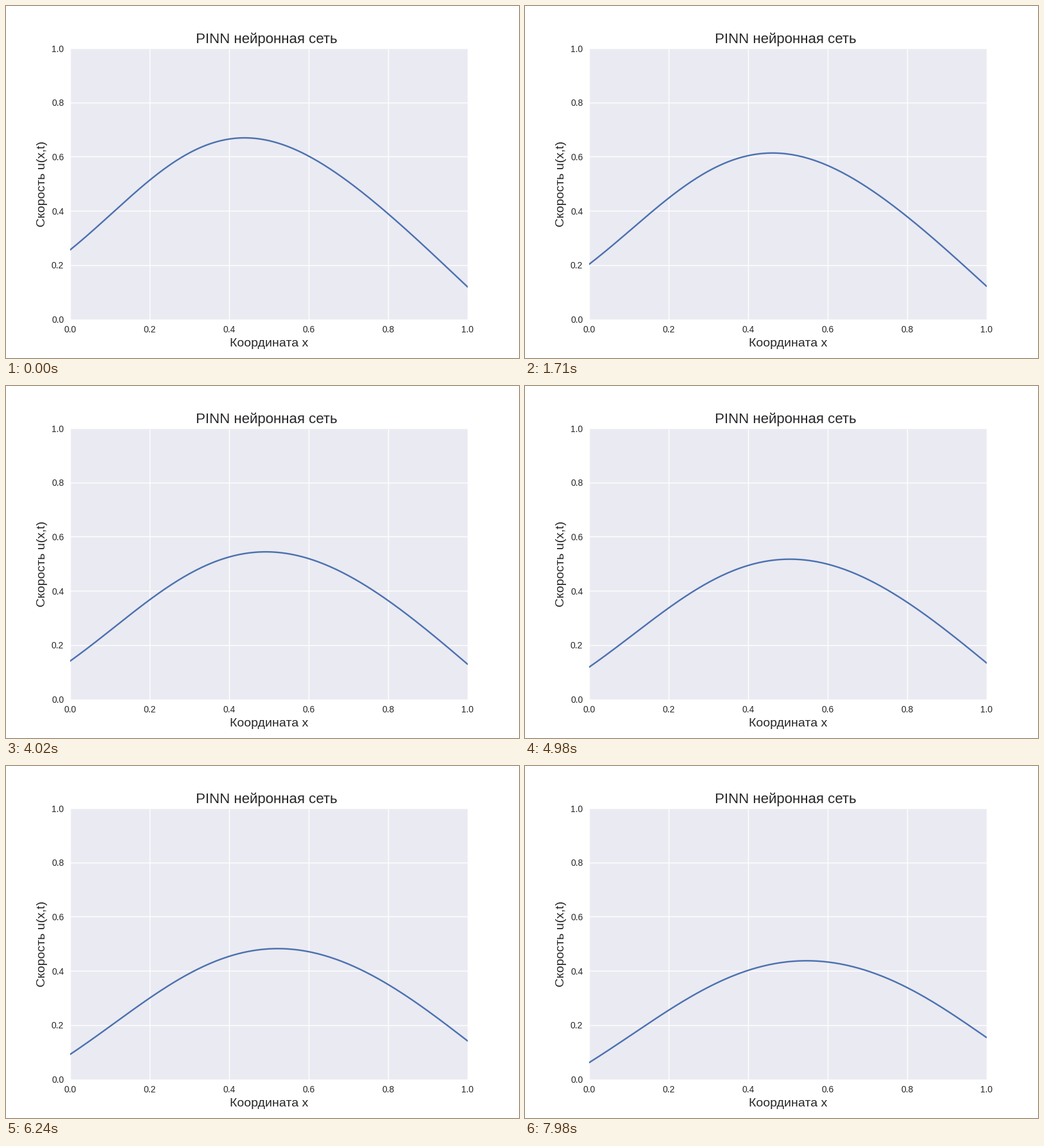
Recreate the animation shown at these times as a matplotlib script. Size 800 by 550 pixels, loop 8 s.

```python
import numpy as np
import matplotlib.pyplot as plt
from matplotlib.animation import FuncAnimation

LOOP_MS = 8000
STEP_MS = 32
INK = "0.15"

plt.rcParams.update({
    "font.family": "Liberation Sans",
    "text.color": INK,
    "axes.labelcolor": INK,
    "axes.facecolor": "#EAEAF2",
    "axes.axisbelow": True,
    "axes.linewidth": 0,
    "grid.color": "white",
    "grid.linewidth": 1,
})

x = np.linspace(0, 1, 200)
KNOTS = [0, 0.1, 0.2, 0.4, 0.6, 0.8, 0.9, 1]


def profile(*heights):
    """Smooth curve through the key heights at KNOTS."""
    return np.polyval(np.polyfit(KNOTS, heights, len(KNOTS) - 1), x)


start = profile(0.256, 0.384, 0.513, 0.665, 0.602, 0.389, 0.257, 0.119)
middle = profile(0.141, 0.253, 0.367, 0.525, 0.519, 0.364, 0.252, 0.129)
end = profile(0.061, 0.157, 0.254, 0.401, 0.432, 0.338, 0.253, 0.154)


def velocity(s):
    """Quadratic blend of the three profiles, s running from 0 to 1."""
    return (start * (1 - s) * (1 - 2 * s)
            + middle * 4 * s * (1 - s)
            + end * s * (2 * s - 1))


fig, ax = plt.subplots(figsize=(8, 5.5), dpi=100, facecolor="white")
fig.subplots_adjust(left=0.125, right=0.9, bottom=0.11, top=0.88)
ax.set(xlim=(0, 1), ylim=(0, 1))
ax.grid(True)
ax.tick_params(length=0, pad=7, labelsize=10, labelcolor=INK)
ax.set_title("PINN нейронная сеть", fontsize=16, x=0.494)
ax.set_xlabel("Координата x", fontsize=14)
ax.set_ylabel("Скорость u(x,t)", fontsize=14)
line, = ax.plot(x, velocity(0), color="#4C72B0", lw=1.75,
                solid_capstyle="round")


def update(i):
    line.set_ydata(velocity(i * STEP_MS / LOOP_MS))
    return line,


anim = FuncAnimation(fig, update, frames=LOOP_MS // STEP_MS,
                     interval=STEP_MS, repeat=True, repeat_delay=0)
plt.show()
```
